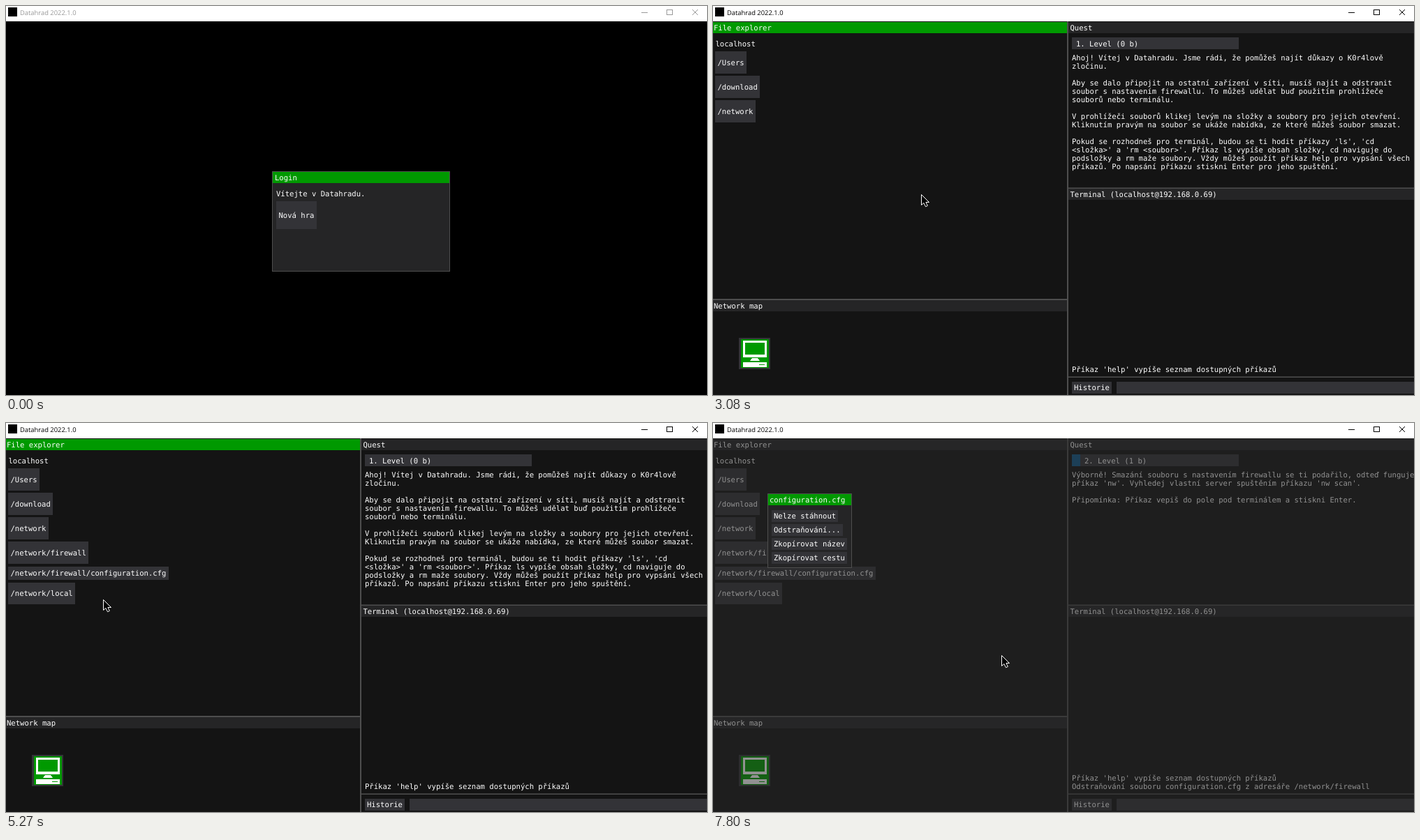
Recreate the animation shown at these times as an HTML page with a canvas. Size 1004 by 558 pixels, loop 8000 ms.

```html
<!DOCTYPE html>
<html lang="cs">
<head>
<meta charset="utf-8">
<style>
  html, body { margin: 0; width: 100%; height: 100%; overflow: hidden; background: #000; }
  canvas { display: block; }
</style>
</head>
<body>
<canvas id="stage" width="1004" height="558"></canvas>
<script>
const ctx = document.getElementById('stage').getContext('2d');
const LOOP = 8000;
const MONO = '10.58px "DejaVu Sans Mono", monospace';
const CHAR = 6.37;
const GREEN = '#009900', PANEL = '#333337', BAR = '#252526', EDGE = '#4e4e4e';
const HOVER = 'rgba(29,151,236,.404)', PRESSED = '#0077c8';

// Moments at which the state of the game changes
const T = { focus: 1130, release: 1260, start: 1330, network: 4280, firewall: 5070,
            rightClick: 5870, popup: 5940, remove: 7070, removed: 7200 };
const PRESSES = [[T.focus, T.release], [4210, T.network], [5010, T.firewall], [T.remove, T.removed]];

// Cursor strokes: points are [time, x, y]; the cursor is hidden between strokes
const STROKES = [
  [[190, 768, 442], [400, 640, 385], [650, 505, 325], [930, 427, 299], [2390, 427, 299]],
  [[2660, 654, 491], [2860, 480, 375], [3080, 299, 271], [3270, 120, 155], [3410, 58, 115],
   [3480, 52, 119], [3800, 46, 146], [4080, 48, 153], [4280, 48, 153],
   [4540, 128, 264], [4740, 105, 192], [4870, 101, 187], [5070, 101, 187],
   [5330, 150, 273], [5600, 174, 216], [5740, 176, 208], [6340, 176, 208],
   [6530, 145, 172], [6670, 124, 152], [7540, 124, 152], [7660, 245, 225], [7800, 413, 333], [LOOP, 413, 333]]
];

const INTRO = [
  'Ahoj! Vítej v Datahradu. Jsme rádi, že pomůžeš najít důkazy o K0r4lově', 'zločinu.', '',
  'Aby se dalo připojit na ostatní zařízení v síti, musíš najít a odstranit',
  'soubor s nastavením firewallu. To můžeš udělat buď použitím prohlížeče',
  'souborů nebo terminálu.', '',
  'V prohlížeči souborů klikej levým na složky a soubory pro jejich otevření.',
  'Kliknutím pravým na soubor se ukáže nabídka, ze které můžeš soubor smazat.', '',
  "Pokud se rozhodneš pro terminál, budou se ti hodit příkazy 'ls', 'cd",
  "<složka>' a 'rm <soubor>'. Příkaz ls vypíše obsah složky, cd naviguje do",
  'podsložky a rm maže soubory. Vždy můžeš použít příkaz help pro vypsání všech',
  'příkazů. Po napsání příkazu stiskni Enter pro jeho spuštění.'
];
const NEXT = [
  'Výborně! Smazání souboru s nastavením firewallu se ti podařilo, odteď funguje',
  "příkaz 'nw'. Vyhledej vlastní server spuštěním příkazu 'nw scan'.", '',
  'Připomínka: Příkaz vepiš do pole pod terminálem a stiskni Enter.'
];

let time = 0, cursor = null;

function cursorAt(t) {
  for (const stroke of STROKES) {
    for (let i = 1; i < stroke.length; i++) {
      const [t0, x0, y0] = stroke[i - 1], [t1, x1, y1] = stroke[i];
      if (t >= t0 && t < t1) {
        const k = (t - t0) / (t1 - t0);
        return { x: x0 + (x1 - x0) * k, y: y0 + (y1 - y0) * k };
      }
    }
  }
  return null;
}

function rect(color, x, y, w, h) {
  ctx.fillStyle = color;
  ctx.fillRect(x, y, w, h);
}

function poly(points, color) {
  ctx.beginPath();
  points.forEach(([x, y]) => ctx.lineTo(x, y));
  ctx.closePath();
  ctx.fillStyle = color;
  ctx.fill();
}

function cross(x, y, r, color) {
  ctx.strokeStyle = color;
  ctx.lineWidth = 1;
  ctx.beginPath();
  ctx.moveTo(x - r, y - r); ctx.lineTo(x + r, y + r);
  ctx.moveTo(x + r, y - r); ctx.lineTo(x - r, y + r);
  ctx.stroke();
}

// Text is placed by the vertical middle of its line
function text(str, x, middle) {
  ctx.font = MONO;
  ctx.fillStyle = '#fff';
  ctx.fillText(str, x, middle + 3.5);
}

const lines = (list, x, middle) => list.forEach((line, i) => text(line, x, middle + 12 * i));

function button(label, x, y, h, enabled, pad = 3.5) {
  const w = Math.round(label.length * CHAR + 2 * pad);
  const over = enabled && cursor && cursor.x >= x && cursor.x < x + w && cursor.y >= y && cursor.y < y + h;
  const down = PRESSES.some(([a, b]) => time >= a && time < b);
  rect(over ? (down ? PRESSED : HOVER) : PANEL, x, y, w, h);
  text(label, x + pad, y + h / 2);
}

function titleBar(label, x, y, w, active) {
  rect(active ? GREEN : BAR, x, y, w, 16);
  text(label, x, y + 8);
}

function frame(x, y, w, h) {
  rect(BAR, x, y, w, h);
  ctx.strokeStyle = EDGE;
  ctx.lineWidth = 1;
  ctx.strokeRect(x + .5, y + .5, w - 1, h - 1);
}

function windowBar() {
  const color = time < T.focus ? '#999' : '#000';
  rect('#fff', 0, 0, 1004, 22);
  rect('#000', 3, 2, 13, 13);
  ctx.font = '9.4px "Open Sans", sans-serif';
  ctx.fillStyle = color;
  ctx.fillText('Datahrad 2022.1.0', 20, 13);
  rect(color, 910, 9, 9, 1);
  ctx.strokeStyle = color;
  ctx.lineWidth = 1;
  ctx.strokeRect(946.5, 5.5, 8, 7);
  cross(987, 9, 4, color);
}

function login() {
  frame(381, 237, 255, 144);
  rect(GREEN, 382, 238, 253, 16);
  text('Login', 385, 246);
  text('Vítejte v Datahradu.', 387, 269.5);
  button('Nová hra', 387, 280, 40, time >= T.focus);
}

function computer() {
  rect(PANEL, 37, 476, 45, 45);
  rect(GREEN, 40, 478, 40, 41);
  rect('#fff', 43, 480, 34, 24);
  rect(GREEN, 46, 483, 28, 17);
  poly([[56, 505], [64, 505], [67, 509], [53, 509]], '#fff');
  rect('#fff', 43, 511, 34, 7);
  rect(GREEN, 66, 514, 8, 1);
}

function explorer(enabled) {
  titleBar('File explorer', 1, 23, 506, enabled);
  rect(enabled ? GREEN : BAR, 0, 23, 1, 16);
  text('localhost', 3.5, 54);
  const open = time >= T.firewall;
  const folders = ['/Users', '/download', '/network'];
  if (time >= T.network) folders.push('/network/firewall');
  folders.forEach((name, i) => button(name, 3, Math.round(65 + 35.1 * i), 32, enabled));
  if (open) button('/network/firewall/configuration.cfg', 3, 206, 19, enabled);
  if (time >= T.network) button('/network/local', 3, open ? 229 : 206, 31, enabled);
}

function desktop() {
  const enabled = time < T.popup, done = time >= T.removed;
  rect('#141414', 0, 22, 1004, 536);
  explorer(enabled);

  rect(BAR, 0, 422, 507, 16);
  text('Network map', 1, 430);
  computer();

  rect(BAR, 509, 23, 495, 16);
  text('Quest', 511.5, 31);
  rect(PANEL, 514, 45, 239, 17);
  if (done) rect('#10588a', 514, 45, 12, 17);
  text(done ? '2. Level (1 b)' : '1. Level (0 b)', done ? 532 : 520, 54);
  lines(done ? NEXT : INTRO, 514, 74);

  rect(BAR, 509, 262, 495, 16);
  text('Terminal (localhost@192.168.0.69)', 511.5, 270);
  const help = "Příkaz 'help' vypíše seznam dostupných příkazů";
  lines(done ? [help, 'Odstraňování souboru configuration.cfg z adresáře /network/firewall'] : [help],
        514, done ? 509 : 521);
  button('Historie', 514, 539, 17, enabled, 3);
  rect(PANEL, 578, 539, 426, 17);

  rect(EDGE, 507, 22, 2, 536);
  rect(EDGE, 0, 420, 507, 2);
  rect(EDGE, 509, 260.5, 495, 1.5);
  rect(EDGE, 509, 531.5, 495, 1.5);
}

function popup() {
  const done = time >= T.removed;
  const fade = Math.min(1, .43 + (time - T.popup) / 230);
  rect(`rgba(40,40,40,${.51 * fade})`, 0, 22, 1004, 536);
  frame(78, 101, 121, 107);
  rect(GREEN, 79, 102, 119, 16);
  text(done ? 'configuration.cfg' : 'configuration.cf', 81, 110.5);
  if (!done) cross(188.5, 110, 4, '#fff');
  ['Nelze stáhnout', done ? 'Odstraňování...' : 'Odstranit', 'Zkopírovat název', 'Zkopírovat cestu']
    .forEach((label, i) => button(label, 84, 125 + 20 * i, 17, true, 3));
}

function pointer({ x, y }) {
  ctx.save();
  ctx.translate(Math.round(x) + .5, Math.round(y) + .5);
  poly([[0, 0], [0, 15], [3.4, 12], [6, 17.3], [8.8, 16], [6.4, 11], [11, 11]], '#000');
  ctx.strokeStyle = '#fff';
  ctx.lineWidth = 1;
  ctx.stroke();
  ctx.restore();
}

function draw(t) {
  time = t;
  cursor = cursorAt(t);
  rect('#000', 0, 0, 1004, 558);
  windowBar();
  if (t < T.start) login();
  else desktop();
  if (t >= T.popup) popup();
  if (t >= T.rightClick && t < 6070) {
    ctx.beginPath();
    ctx.arc(176.5, 210.5, 10, 0, 2 * Math.PI);
    ctx.fillStyle = 'rgba(225,15,20,.75)';
    ctx.fill();
  }
  if (cursor) pointer(cursor);
}

ctx.textRendering = 'geometricPrecision';
const begin = performance.now();
function tick() {
  draw((performance.now() - begin) % LOOP);
  requestAnimationFrame(tick);
}
tick();
</script>
</body>
</html>
```
